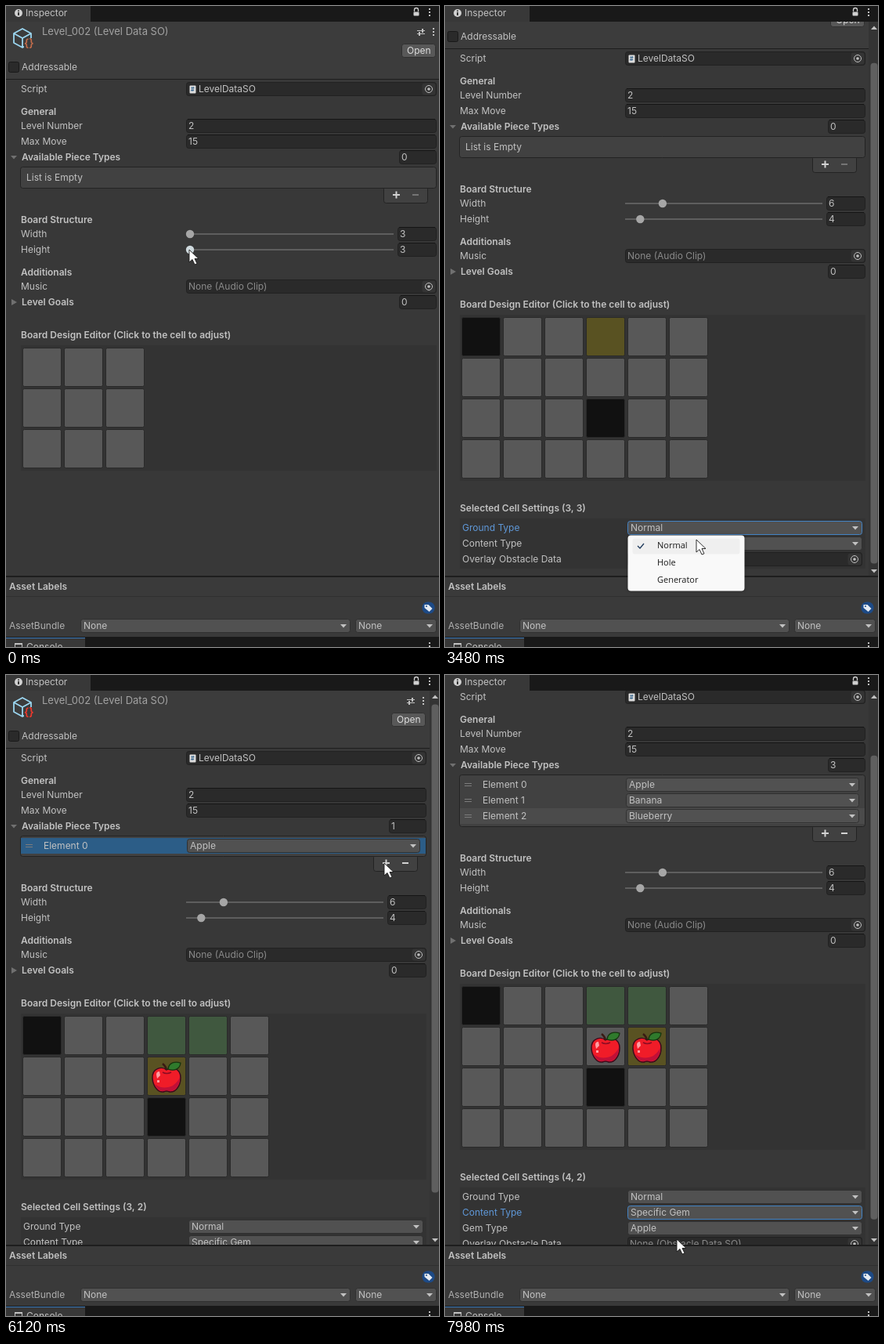
These frames come from a looping animation (553x818 px, 8000 ms). An HTML page with a canvas:

```html
<!DOCTYPE html>
<html lang="en">
<head>
<meta charset="utf-8">
<title>Level inspector</title>
<style>
  html, body { margin: 0; width: 100%; height: 100%; overflow: hidden; background: #383838; }
  canvas { display: block; width: 553px; height: 818px; }
</style>
</head>
<body>
<canvas id="stage" width="553" height="818"></canvas>
<script>
const LOOP = 8000;
const g = document.getElementById('stage').getContext('2d');
const TEXT = '#c2c2c2', DIM = '#7d7d7d', BLUE = '#5f98d8', EDGE = '#232323';

// State changes over time; `cell` applies to the selected cell.
const EVENTS = [
  [170, { height: 4 }],
  [550, { width: 4 }], [610, { width: 5 }], [670, { width: 6 }],
  [1100, { sel: '0,3' }],
  [1630, { focus: 'ground' }],
  [2005, { cell: { ground: 'Hole' } }],
  [2510, { sel: '3,1' }],
  [3020, { cell: { ground: 'Hole' } }],
  [3280, { sel: '3,3' }],
  [3760, { cell: { ground: 'Generator' } }],
  [4110, { sel: '4,3' }],
  [4530, { cell: { ground: 'Generator' } }],
  [4700, { sel: '3,2' }],
  [4900, { focus: 'content' }],
  [5190, { cell: { gem: true } }],
  [6050, { focus: null, pieces: ['Apple'], row: 0, active: true }],
  [6200, { pieces: ['Apple', 'Apple'], row: 1 }],
  [6340, { pieces: ['Apple', 'Apple', 'Apple'], row: 2 }],
  [6500, { row: 1, active: false, focus: 'row' }],
  [6650, { pieces: ['Apple', 'Banana', 'Apple'] }],
  [7030, { pieces: ['Apple', 'Banana', 'Blueberry'], row: 2, focus: 'row' }],
  [7480, { sel: '4,2', focus: null }],
  [7630, { focus: 'content' }],
  [7820, { cell: { gem: true } }],
];

const GROUNDS = ['Normal', 'Hole', 'Generator'];
const CONTENTS = ['Random Gem', 'Specific Gem', 'Obstacle', 'Empty'];
const FRUITS = ['Apple', 'Banana', 'Blueberry', 'Grape', 'Orange', 'Pear', 'Strawberry'];
const groundMenu = (open, close, pick) => ({ open, close, pick, x: 233, y: 675, w: 150, items: GROUNDS });
const contentMenu = (open, close) => ({ open, close, pick: 1, x: 233, y: 695, w: 166, items: CONTENTS });
const fruitMenu = (open, close, pick, y) => ({ open, close, pick, x: 231, y, w: 154, items: FRUITS });
const MENUS = [
  groundMenu(1640, 2005, 1), groundMenu(2790, 3020, 1),
  groundMenu(3370, 3760, 2), groundMenu(4310, 4530, 2),
  contentMenu(4910, 5190), contentMenu(7640, 7820),
  fruitMenu(6505, 6650, 1, 247), fruitMenu(6758, 7030, 2, 267),
];

const SCROLL = [[0, 0], [1280, 0], [1440, 39], [5540, 39], [5760, 0], [7310, 0], [7410, 78]];

// Pointer stops [time, x, y]: the pointer rests briefly at each one.
const DRAG_STOPS = [[15, 234, 311], [220, 250, 311], [290, 250, 311], [480, 235, 291], [710, 281, 291], [790, 281, 291]];
const CLICK_STOPS = [
  [1090, 48, 460], [1620, 330, 664], [1995, 348, 708],
  [2500, 205, 525], [2780, 310, 664], [3000, 320, 708],
  [3275, 205, 420], [3365, 318, 666], [3740, 318, 731],
  [4100, 258, 420], [4300, 318, 664], [4510, 318, 731],
  [4690, 207, 474], [4890, 325, 683], [5170, 315, 729],
  [6030, 483, 240], [6185, 483, 240], [6325, 483, 260],
  [6490, 345, 239], [6635, 330, 282], [6745, 335, 260], [7010, 310, 324],
  [7470, 258, 474], [7620, 305, 684], [7800, 296, 720],
];
const PAUSES = [[3480, 321, 681], [4830, 325, 675]];
const CURSOR = [...DRAG_STOPS, ...CLICK_STOPS, ...PAUSES]
  .sort((a, b) => a[0] - b[0])
  .flatMap(([t, x, y]) => [[t - 15, x, y], [t + 45, x, y]]);
const PRESSES = [[60, 230], [490, 720], ...CLICK_STOPS.map(([t]) => [t, t + 40])];

const clamp = v => Math.max(0, Math.min(1, v));

function sample(keys, t) {
  let i = 1;
  while (i < keys.length - 1 && keys[i][0] < t) i++;
  const a = keys[i - 1], b = keys[i];
  const p = clamp((t - a[0]) / (b[0] - a[0])), e = p * p * (3 - 2 * p);
  return a.slice(1).map((v, k) => v + (b[k + 1] - v) * e);
}

function stateAt(t) {
  const s = { width: 3, height: 3, pieces: [], sel: null, focus: null, row: -1, active: false, cells: {} };
  for (const [at, patch] of EVENTS) {
    if (at > t) break;
    const { cell, ...rest } = patch;
    Object.assign(s, rest);
    if (cell) s.cells[s.sel] = { ...s.cells[s.sel], ...cell };
  }
  return s;
}

const cellOf = (s, key) => ({ ground: 'Normal', gem: false, ...s.cells[key] });

// Drawing helpers
function rect(x, y, w, h, color) { g.fillStyle = color; g.fillRect(x, y, w, h); }

function box(x, y, w, h, fill, stroke, r = 3) {
  g.beginPath();
  g.roundRect(x + .5, y + .5, w - 1, h - 1, r);
  g.fillStyle = fill;
  g.fill();
  if (stroke) { g.strokeStyle = stroke; g.lineWidth = 1; g.stroke(); }
}

function text(str, x, y, color = TEXT, font = '12px Inter, sans-serif') {
  g.font = font;
  g.textBaseline = 'middle';
  g.fillStyle = color;
  g.fillText(str, x, y);
}

const bold = (str, x, y) => text(str, x, y, TEXT, '600 12px Inter, sans-serif');

function disc(x, y, r, color) {
  g.beginPath();
  g.arc(x, y, r, 0, 7);
  g.fillStyle = color;
  g.fill();
}

function ring(x, y, r, color) {
  g.beginPath();
  g.arc(x, y, r, 0, 7);
  g.strokeStyle = color;
  g.lineWidth = 1;
  g.stroke();
}

function shape(d, x, y, fill, stroke, width = 1) {
  const path = new Path2D(d);
  g.save();
  g.translate(x, y);
  if (fill) { g.fillStyle = fill; g.fill(path); }
  if (stroke) { g.strokeStyle = stroke; g.lineWidth = width; g.lineJoin = 'round'; g.stroke(path); }
  g.restore();
}

const down = (x, y, color = TEXT) => shape('M-4-2H4L0 2.5Z', x, y, color);
const dots = (x, y) => [-4, 0, 4].forEach(d => rect(x - 1, y + d - 1, 2, 2, TEXT));

function field(x, right, y, value) {
  box(x, y - 9, right - x, 18, '#2a2a2a', '#212121');
  rect(x + 2, y - 9, right - x - 4, 1, '#151515');
  text(value, x + 3, y);
}

function objectField(x, right, y, value, color, textX = x + 3) {
  box(x, y - 9, right - x, 18, '#2a2a2a', '#212121');
  box(right - 19, y - 8, 18, 16, '#343434');
  ring(right - 10, y, 4.5, TEXT);
  disc(right - 10, y, 1.8, TEXT);
  text(value, textX, y, color);
}

function popup(x, right, y, value, { focused, disabled } = {}) {
  box(x, y - 9, right - x, 18, disabled ? '#424242' : '#515151', focused ? '#4383c4' : '#303030');
  text(value, x + 4, y, disabled ? DIM : TEXT);
  down(right - 9, y, disabled ? DIM : TEXT);
}

function slider(label, value, y, R, [cx, cy]) {
  text(label, 19, y);
  rect(230, y - 1, R - 285, 2, '#5e5e5e');
  const x = 235 + (value - 3) * (R - 294) / 17;
  disc(x, y, 5.2, Math.hypot(cx - x, cy - y) < 6 ? '#cfdade' : '#a6a6a6');
  field(R - 50, R, y, value);
}

function apple(x, y) {
  shape('M0-9C-5-14-19-12-18 2C-17 13-10 20-4 19Q0 17 4 19C11 20 18 12 18 1C18-12 6-13 0-9Z', x, y, '#f01c28', '#3a0a1c', 1.5);
  shape('M17 0C17 12 10 19 4 18Q0 16-4 18C-9 18-13 14-15 9C-8 15 2 14 8 11Q15 6 17 0Z', x, y, '#c01038');
  shape('M0-9Q-1-14-5-17', x, y, null, '#3a1a14', 2.5);
  shape('M2-10C3-19 11-20 18-18C17-10 10-7 2-10Z', x, y, '#2f7a2c', '#17330f', 1.3);
  shape('M-5-6Q0-3 6-6', x, y, null, '#8c0c24', 1.5);
  shape('M-13-3Q-13-7-9-7L-8-2L-12 2Z', x, y, '#ff9ea4');
  rect(x - 12, y + 4, 3, 3, '#ff9ea4');
}

function header(R, t) {
  rect(0, 20, 553, 73, '#3c3c3c');
  rect(0, 93, 553, 1, '#1d1d1d');
  shape('M0-12L11-6V6L0 12L-11 6V-6ZM-11-6L0 0L11-6M0 0V12', 21, 41, null, '#9bd6f0', 1.8);
  rect(23, 41, 16, 15, '#3c3c3c');
  text('{}', 23, 48, t < 4860 ? '#c26c4b' : '#f2382c', '600 14px Inter, sans-serif');
  text('Level_002 (Level Data SO)', 46, 33, '#a2a2a2', '13px Inter, sans-serif');
  rect(R - 25, 31, 10, 1, TEXT);
  rect(R - 25, 35, 10, 1, TEXT);
  rect(R - 19, 29, 2, 5, TEXT);
  rect(R - 23, 33, 2, 5, TEXT);
  dots(R - 4, 33);
  box(R - 45, 48, 44, 18, '#585858', '#303030');
  text('Open', R - 38, 57, '#dedede');
  box(3, 71, 14, 14, '#2a2a2a', '#191919', 2);
  text('Addressable', 20, 78);
}

function pieceList(s, R) {
  const n = s.pieces.length, bottom = 205 + (n ? 7 + 20 * n : 28);
  down(10, 193, '#707070');
  bold('Available Piece Types', 20, 193);
  field(R - 48, R, 193, n);
  box(R - 68, bottom - 3, 57, 22, '#414141', EDGE);
  box(18, 205, R - 18, bottom - 205, '#414141', EDGE);
  if (!n) text('List is Empty', 26, 219);
  s.pieces.forEach((name, i) => {
    const y = 218 + 20 * i, on = i === s.row, focused = on && s.focus === 'row';
    if (on) rect(19, y - 10, R - 20, 20, s.active ? '#2c5d87' : '#4b4b4b');
    rect(25, y - 2, 9, 1, '#7c7c7c');
    rect(25, y + 1, 9, 1, '#7c7c7c');
    text('Element ' + i, 48, y, focused ? '#7ba3d6' : TEXT);
    popup(231, R - 8, y, name, { focused });
  });
  const y = bottom + 8;
  rect(R - 56, y - 1, 9, 2, '#d2d2d2');
  rect(R - 52.5, y - 4.5, 2, 9, '#d2d2d2');
  rect(R - 31, y - 1, 8, 2, n ? '#d2d2d2' : '#757575');
}

const GROUND_COLORS = {
  Normal: ['#585858', '#595222'], Hole: ['#111111', '#3b360a'], Generator: ['#40583f', '#4b5420'],
};

function board(s, R, dy) {
  bold('Board Design Editor (Click to the cell to adjust)', 19, 420 + dy);
  rect(19, 433 + dy, R - 19, 4 + 52 * s.height, '#333333');
  for (let r = 0; r < s.height; r++) for (let c = 0; c < s.width; c++) {
    const key = c + ',' + (s.height - 1 - r), cell = cellOf(s, key);
    const x = 22 + 53 * c, y = 437 + 52 * r + dy;
    box(x - 1, y - 1, 50, 50, GROUND_COLORS[cell.ground][+(key === s.sel)], '#2a2a2a', 2);
    if (cell.gem) apple(x + 24, y + 25);
  }
}

function cellSettings(s, R, dy) {
  const cell = cellOf(s, s.sel), disabled = cell.ground === 'Hole';
  const right = R - 4;
  let y = 705 + dy;
  bold(`Selected Cell Settings (${s.sel.replace(',', ', ')})`, 19, 680 + dy);
  rect(19, y - 12, R - 19, cell.gem ? 84 : 64, '#333333');
  const row = (label, id, value, off) => {
    const focused = s.focus === id;
    text(label, 22, y, focused ? BLUE : off ? DIM : TEXT);
    popup(233, right, y, value, { focused, disabled: off });
    y += 20;
  };
  row('Ground Type', 'ground', cell.ground);
  row('Content Type', 'content', CONTENTS[+cell.gem], disabled);
  if (cell.gem) row('Gem Type', 'gem', 'Apple');
  text('Overlay Obstacle Data', 22, y, disabled ? DIM : TEXT);
  objectField(233, right, y, 'None (Obstacle Data SO)', disabled ? '#5c5c5c' : '#8a8a8a');
}

function scrollbar(s, dy, scroll) {
  const total = 747 + dy + (cellOf(s, s.sel).gem ? 20 : 0);
  rect(541, 20, 12, 708, '#343434');
  shape('M-4 2H4L0-2.5Z', 548, 28, TEXT);
  down(548, 721);
  box(543, 37 + 675 * scroll / total, 10, 675 * 708 / total, '#5f5f5f', null, 4);
}

function content(s, t, cursor) {
  const R = s.sel ? 537 : 550, n = s.pieces.length, dy = n ? 20 * n - 21 : 0;
  const [scroll] = sample(SCROLL, t);
  const local = [cursor[0], cursor[1] + scroll];
  g.save();
  g.beginPath();
  g.rect(0, 20, 553, 708);
  g.clip();
  g.translate(0, -Math.round(scroll));
  header(R, t);
  text('Script', 19, 106);
  objectField(230, R, 106, 'LevelDataSO', TEXT, 246);
  box(234, 101, 9, 11, '#dcdcdc', null, 1);
  text('#', 236, 107, '#2c5d87', '700 7px Inter, sans-serif');
  bold('General', 19, 135);
  text('Level Number', 19, 153);
  field(230, R, 153, 2);
  text('Max Move', 19, 173);
  field(230, R, 173, 15);
  pieceList(s, R);
  bold('Board Structure', 19, 273 + dy);
  slider('Width', s.width, 291 + dy, R, local);
  slider('Height', s.height, 311 + dy, R, local);
  bold('Additionals', 19, 340 + dy);
  text('Music', 19, 358 + dy);
  objectField(230, R, 358 + dy, 'None (Audio Clip)', '#8a8a8a');
  shape('M-3-4V4L4 0Z', 10, 378 + dy, '#707070');
  bold('Level Goals', 20, 378 + dy);
  field(R - 48, R, 378 + dy, 0);
  board(s, R, dy);
  if (s.sel) cellSettings(s, R, dy);
  g.restore();
  if (s.sel) scrollbar(s, dy, scroll);
}

function chrome() {
  rect(0, 0, 553, 20, '#191919');
  rect(0, 0, 108, 20, '#383838');
  disc(16, 9, 5, '#d0d0d0');
  rect(15, 8, 2, 4, '#383838');
  rect(15, 5.5, 2, 1.5, '#383838');
  text('Inspector', 25, 9);
  box(520, 7, 8, 6, '#d0d0d0', null, 1);
  shape('M-2.5 0V-2A2.5 2.5 0 0 1 2.5-2V0', 524, 7, null, '#d0d0d0', 1.3);
  dots(541, 8);

  rect(0, 728, 553, 78, '#3a3a3a');
  rect(0, 727, 553, 2, '#1e1e1e');
  bold('Asset Labels', 4, 741);
  rect(0, 753, 553, 1, '#303030');
  box(531, 760, 17, 16, '#1d4a86', null, 7);
  shape('M-5-4H0L5 1L1 5L-5 0Z', 539.5, 768, '#e4eaf2');
  disc(537, 766, 1, '#1d4a86');
  text('AssetBundle', 4, 791, '#b0b0b0');
  popup(95, 440, 791, 'None');
  popup(446, 550, 791, 'None');
  rect(0, 805, 553, 13, '#191919');
  rect(0, 806, 101, 12, '#383838');
  rect(0, 806, 101, 1, '#3a79bb');
  box(11, 813, 10, 8, '#383838', TEXT, 1);
  rect(11, 813, 10, 2, TEXT);
  text('Console', 26, 818);
  dots(541, 817);
}

function drawMenu(m, t, [, cy]) {
  const label = i => text(m.items[i], m.x + 38, m.y + 14 + 22 * i, '#1b1b1b', '11px "Open Sans", sans-serif');
  g.save();
  if (t >= m.close) {
    g.globalAlpha = clamp(1 - (t - m.close) / 150);
    rect(m.x + 3, m.y + 3 + 22 * m.pick, m.w - 6, 22, '#f2f2f2');
    label(m.pick);
  } else {
    g.globalAlpha = clamp((t - m.open) / 110);
    g.shadowColor = 'rgba(0,0,0,.35)';
    g.shadowBlur = 4;
    box(m.x, m.y, m.w, 22 * m.items.length + 6, '#f9f9f9', null, 4);
    g.shadowColor = 'transparent';
    const hover = Math.floor((cy - m.y - 3) / 22);
    if (hover >= 0 && hover < m.items.length) box(m.x + 6, m.y + 4 + 22 * hover, m.w - 12, 21, '#efefef');
    m.items.forEach((_, i) => label(i));
    shape('M-4 0L-1 3L4-3', m.x + 17, m.y + 14, null, '#1f3a5c', 1.3);
  }
  g.restore();
}

function draw(t) {
  const s = stateAt(t), cursor = sample(CURSOR, t);
  rect(0, 0, 553, 818, '#383838');
  content(s, t, cursor);
  chrome();
  for (const m of MENUS) if (t >= m.open && t < m.close + 150) drawMenu(m, t, cursor);
  if (PRESSES.some(([a, b]) => t >= a && t < b)) disc(...cursor, 12, 'rgba(190,186,30,.88)');
  shape('M0 0V16L4 12.5L7 19L10 17.8L7 11.5H12Z', ...cursor, '#ffffff', '#1a1a1a', .9);
}

function tick() {
  draw(performance.now() % LOOP);
  requestAnimationFrame(tick);
}
tick();
</script>
</body>
</html>
```
